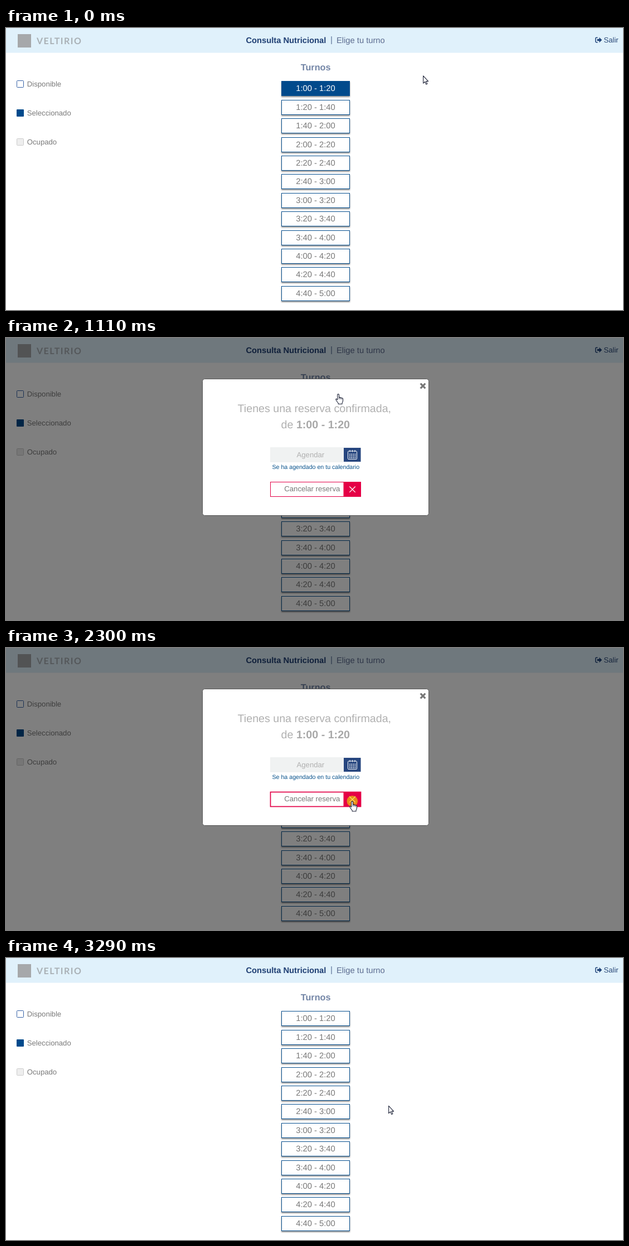
Animation, 1107 px wide and 506 px high, one loop 3520 ms. Source, as an HTML page:

```html
<!DOCTYPE html>
<html lang="es">
<head>
<meta charset="utf-8">
<title>Consulta Nutricional</title>
<style>
  html, body { margin: 0; width: 100%; height: 100%; overflow: hidden; background: #fff; }
  svg { display: block; width: 1107px; height: 506px; }
  text { font-family: "Liberation Sans", Arial, sans-serif; font-size: 13.15px; fill: #7a7a7a;
         text-rendering: geometricPrecision; white-space: pre; }
  .bold { font-weight: 700; }
  .mid { text-anchor: middle; }
  .head { font-size: 14.72px; }
  .big { font-size: 19.65px; fill: #b0b0b0; }
  .brand { font-family: Lato, "Open Sans", sans-serif; font-size: 16px; font-weight: 700;
           letter-spacing: 1.5px; fill: #a9b0b5; }
  .slot rect { fill: #fff; stroke: #07508f; filter: drop-shadow(0 2px 1.3px rgba(0, 0, 0, .42)); }
  .slot text { font-size: 14.72px; text-anchor: middle; fill: #777; }
  .slot.on rect { fill: #004a8c; }
  .slot.on text { fill: #fff; }
  .pointer path { fill: #fff; stroke: #20253a; stroke-width: 1.1; stroke-linejoin: round; }
</style>
</head>
<body>
<svg viewBox="0 0 1107 506">
  <rect width="1107" height="506" fill="#fff"/>
  <rect width="1107" height="44.5" fill="#e0f1fb"/>
  <rect x="21" y="11" width="24" height="24" fill="#a6a8aa"/>
  <text class="brand" x="55" y="28.5">VELTIRIO</text>
  <text class="head bold" x="430.4" y="27" style="fill:#1f3f74">Consulta Nutricional</text>
  <path d="M584 15V29" stroke="#3d5580"/>
  <text class="head" x="593" y="27" style="fill:#5c6c90">Elige tu turno</text>
  <g fill="#1f4379">
    <path d="M1061.5 17.3h-2.3q-1.4 0-1.4 1.4v5.6q0 1.4 1.4 1.4h2.3" fill="none" stroke="#1f4379" stroke-width="1.5"/>
    <path d="M1060.6 19.7h3.8v-2.9l4.9 4.7-4.9 4.7v-2.9h-3.8z"/>
    <text x="1072.4" y="26" style="fill:#2c4b7b">Salir</text>
  </g>

  <rect x="19.5" y="94.5" width="12" height="12" rx="1" fill="#fff" stroke="#3561a6"/>
  <text x="37.8" y="105">Disponible</text>
  <rect x="19" y="146" width="13" height="13" rx="1" fill="#004a8c"/>
  <text x="37.8" y="157.3">Seleccionado</text>
  <rect x="19.5" y="198.5" width="12" height="12" rx="1" fill="#eee" stroke="#ccc"/>
  <text x="37.8" y="208.7">Ocupado</text>

  <text class="bold mid" x="555.6" y="76" style="font-size:16.2px;fill:#7385a6">Turnos</text>
  <g id="slots"></g>
  <rect id="slotFocus" x="494.5" y="95.5" width="122.5" height="27" fill="none" stroke="#4c8fe2" stroke-width="1.6"/>

  <g id="dialog">
    <rect width="1107" height="506" fill="#000" opacity=".5"/>
    <rect x="352.5" y="73.5" width="406" height="245" rx="4" fill="#fff" stroke="#555"/>
    <path d="M743.7 81.7l8.6 8.6m0-8.6l-8.6 8.6" stroke="#777" stroke-width="3.3"/>
    <text class="big" x="415.6" y="133">Tienes una reserva confirmada,</text>
    <text class="big" x="493.6" y="162.3">de <tspan class="bold" fill="#a8a8a8">1:00 - 1:20</tspan></text>

    <rect x="474" y="196" width="132" height="27" fill="#f0f2f2"/>
    <text x="521.5" y="213.6" style="fill:#b0b0b0">Agendar</text>
    <rect x="606" y="197" width="30.5" height="25" fill="#27467f"/>
    <g fill="none" stroke="#fff">
      <rect x="613.5" y="203" width="16" height="14.7" rx="1.5"/>
      <path d="M617 201v3.5m4.5-3.5v3.5m4.5-3.5v3.5"/>
      <path d="M616 208.5h11.5m-11.5 3.2h11.5m-11.5 3.2h11.5" stroke-width="1.7" stroke-dasharray="1.8 1.4"/>
    </g>
    <text x="477.5" y="235" style="font-size:10.63px;fill:#07528c">Se ha agendado en tu calendario</text>

    <rect id="cancel" x="474.5" y="258.5" width="162" height="26" fill="#fff" stroke="#e20047"/>
    <text x="499.3" y="275.4" style="fill:#777">Cancelar reserva</text>
    <rect x="605.5" y="258" width="31.5" height="27" fill="#e50046"/>
    <path d="M616.3 266.5l10.4 10.4m0-10.4l-10.4 10.4" stroke="#fff" stroke-width="1.3"/>
  </g>

  <g class="pointer" id="pointer">
    <circle id="press" cx=".3" cy=".2" r="9.8" fill="#ebd900" fill-opacity=".63"/>
    <path id="arrow" d="M.6 .8V14.2l3.1-2.9 2 4.8 2.1-.9-2-4.6H9.6z"/>
    <g id="hand">
      <path d="M-1.3 11V2a1.4 1.4 0 0 1 2.8 0v5.2a1.3 1.3 0 0 1 2.5.4 1.3 1.3 0 0 1 2.4.6 1.2 1.2 0 0 1 2.1.9V12.6c0 2-1 2.8-1.5 4.1v1.8H.2V17C-1.5 14.9-2.8 13-3.9 11.2-5 9.2-2.8 8.5-1.3 11z"/>
      <path d="M1.5 7v3M4 7.8v2.4M6.4 8.5v2" style="fill:none;stroke-width:.8"/>
    </g>
  </g>
</svg>
<script>
const LOOP = 3520;
const $ = id => document.getElementById(id);
const show = (id, on) => { $(id).style.display = on ? "" : "none"; };
const within = (t, from, to) => t >= from && t < to;

const clock = m => `${1 + Math.floor(m / 60)}:${String(m % 60).padStart(2, "0")}`;
$("slots").innerHTML = Array.from({ length: 12 }, (_, i) => {
  const y = Math.round(95.4 + 33.4 * i);
  return `<g class="slot"><rect x="494.5" y="${y + .5}" width="122" height="26"/>
    <text x="555.5" y="${y + 18.2}">${clock(i * 20)} - ${clock(i * 20 + 20)}</text></g>`;
}).join("");
const firstSlot = $("slots").firstElementChild;

// The pointer jumps to one point per step, as in a screen capture.
const moves = [
  { start: 320, step: 78.3, path: [[742, 85], [722, 88], [694, 91], [660, 94], [628, 97], [606, 99], [596, 100]] },
  { start: 1410, step: 80, path: [[608, 127], [624, 171], [637, 209], [636, 235], [634, 253], [632, 264], [630, 270]] },
  { start: 1970, step: 80, path: [[621, 274.5]] },
  { start: 2890, step: 80, path: [[628, 272], [643, 265], [658, 259], [670, 257], [680, 260], [686, 264.5]] }
];

function pointerAt(t) {
  let spot = [748, 85];
  for (const { start, step, path } of moves) {
    if (t < start) break;
    spot = path[Math.min(path.length - 1, Math.floor((t - start + 4) / step))];
  }
  return spot;
}

function draw(t) {
  const hand = within(t, 710, 1190) || within(t, 1810, 2440);
  $("pointer").setAttribute("transform", `translate(${pointerAt(t)})`);
  show("hand", hand);
  show("arrow", !hand);
  show("press", within(t, 960, 1110) || within(t, 2190, 2370));
  show("slotFocus", within(t, 960, 1110));
  show("dialog", within(t, 1110, 2370));
  $("cancel").setAttribute("stroke-width", within(t, 2300, 2370) ? 1.7 : 1);
  firstSlot.classList.toggle("on", t < 2440);
}

let begin;
function tick(now) {
  begin ??= now;
  draw((now - begin) % LOOP);
  requestAnimationFrame(tick);
}
draw(0);
requestAnimationFrame(tick);
</script>
</body>
</html>
```
